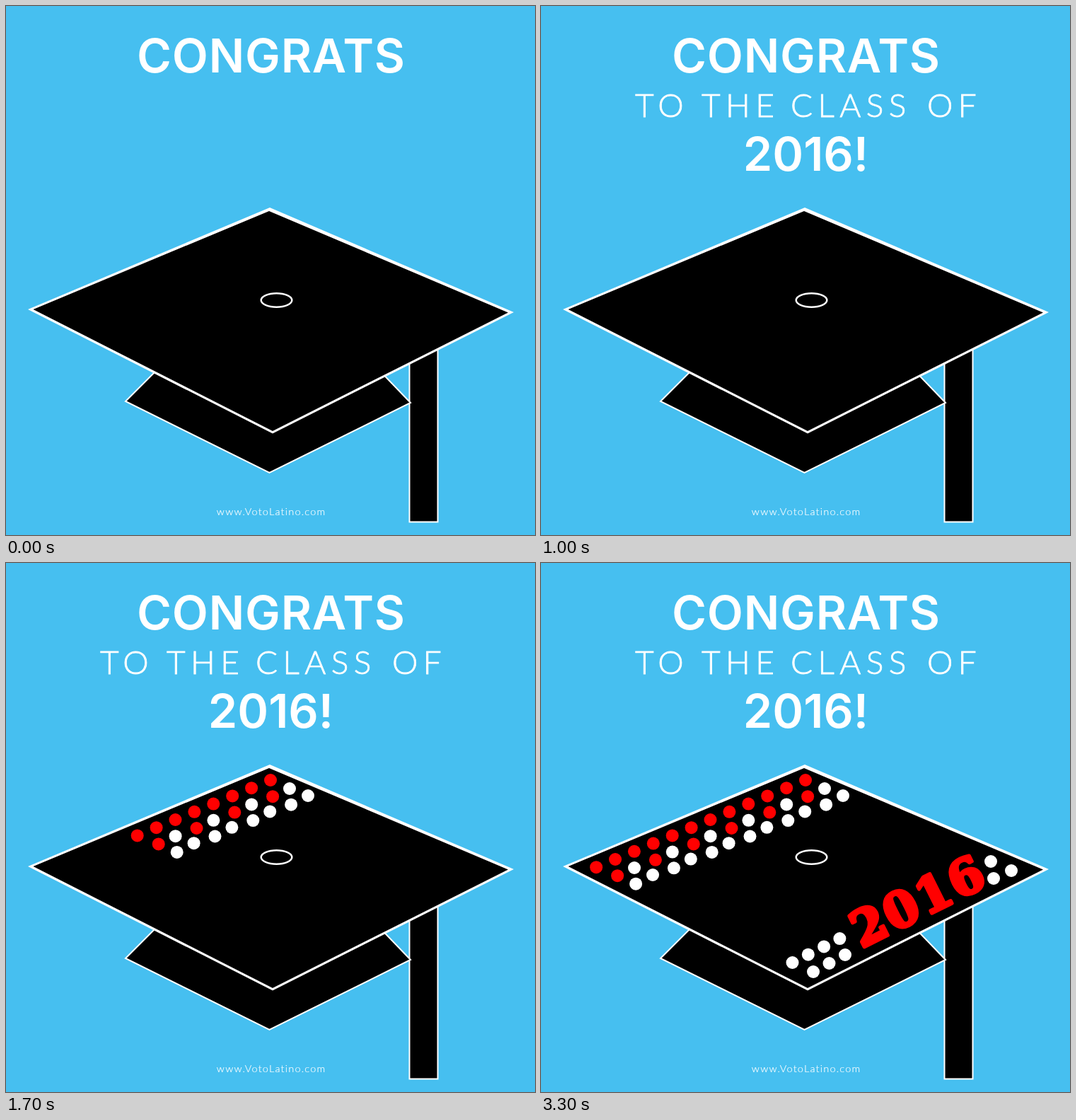
Recreate the animation shown at these times as an HTML page. Size 748 by 748 pixels, loop 4.1 s.

```html
<!DOCTYPE html>
<html lang="en">
<head>
<meta charset="utf-8">
<title>Congrats</title>
<style>
  html, body { margin: 0; width: 100%; height: 100%; overflow: hidden; background: #46bff0; }
  svg { display: block; width: 100%; height: 100%; }
  text { fill: #fff; }
  .bold { font: 600 66.5px Inter, sans-serif; text-anchor: middle; }
  .light { font: 300 46px Lato, sans-serif; letter-spacing: 7.4px; stroke: #fff; stroke-width: 0.8; }
  .site { font: 300 14.5px Lato, sans-serif; letter-spacing: 1.2px; text-anchor: middle; stroke: #fff; stroke-width: 0.2; }
  .year { font: bold 69px "DejaVu Serif", serif; letter-spacing: 3px; text-anchor: middle; fill: red; stroke: red; stroke-width: 5; stroke-linejoin: round; }
  .edge { fill: #000; stroke: #fff; stroke-width: 2; }
</style>
</head>
<body>
<svg viewBox="0 0 748 748">
  <text class="bold" x="374.9" y="93.5" letter-spacing="0.8">CONGRATS</text>
  <text class="light" y="156.5" data-at="500"><tspan x="133">TO</tspan> <tspan x="227">THE</tspan> <tspan x="353">CLASS</tspan> <tspan x="546">OF</tspan></text>
  <text class="bold" x="374.5" y="233" data-at="1000">2016!</text>

  <path class="edge" d="M570.5 480H610.5V729.5H570.5Z"/>
  <path class="edge" d="M230 498L169 559L372.5 660L572 561L520 507Z"/>
  <path fill="#fff" d="M31 429L373 285L718 433L377 604.5Z"/>
  <path d="M38.5 429L372 290L710 433.5L377 601Z"/>
  <ellipse class="edge" cx="382.5" cy="416" rx="21.8" ry="9.8" style="stroke-width:2.5"/>

  <g id="dots"></g>
  <text class="year" transform="translate(542 500.5) rotate(-26.5)" x="2.5" data-at="2100">2016</text>
  <text class="site" x="375.1" y="720">www.VotoLatino.com</text>
</svg>
<script>
  const LOOP = 4100;
  const board = document.getElementById('dots');

  function addDot(at, x, y, color = '#fff') {
    board.innerHTML += `<circle cx="${x}" cy="${y}" r="9" fill="${color}" data-at="${at}"/>`;
  }

  function addRow(at, count, x, y, dx, dy) {
    for (let i = 0; i < count; i++) addDot(at, x + i * dx, y + i * dy);
  }

  // Three rows along the upper edge appear four columns at a time.
  for (let i = 0; i < 12; i++) {
    const at = 1500 + 200 * Math.floor(i / 4);
    const odd = i % 2;
    const x = -26.9 * i, y = 11.2 * i;
    addDot(at, 374 + x, 307 + y, 'red');
    addDot(at, 401 + x + 3 * odd, 319 + y, odd ? 'red' : '#fff');
    addDot(at, 427 + x + 3 * odd, 329 + y + 1.5 * odd);
  }

  // White dots on both sides of the year.
  addRow(2100, 4, 355.5, 565, 22.3, -11.3);
  addRow(2100, 3, 385, 578, 22.5, -12);
  addRow(2100, 2, 640, 446, 25, -11);
  addDot(2100, 636, 422);

  const steps = [...document.querySelectorAll('[data-at]')];
  const start = performance.now();

  function draw(now) {
    const t = Math.max(0, now - start) % LOOP;
    for (const el of steps) el.style.visibility = t >= +el.dataset.at ? 'visible' : 'hidden';
    requestAnimationFrame(draw);
  }
  draw(start);
</script>
</body>
</html>
```
